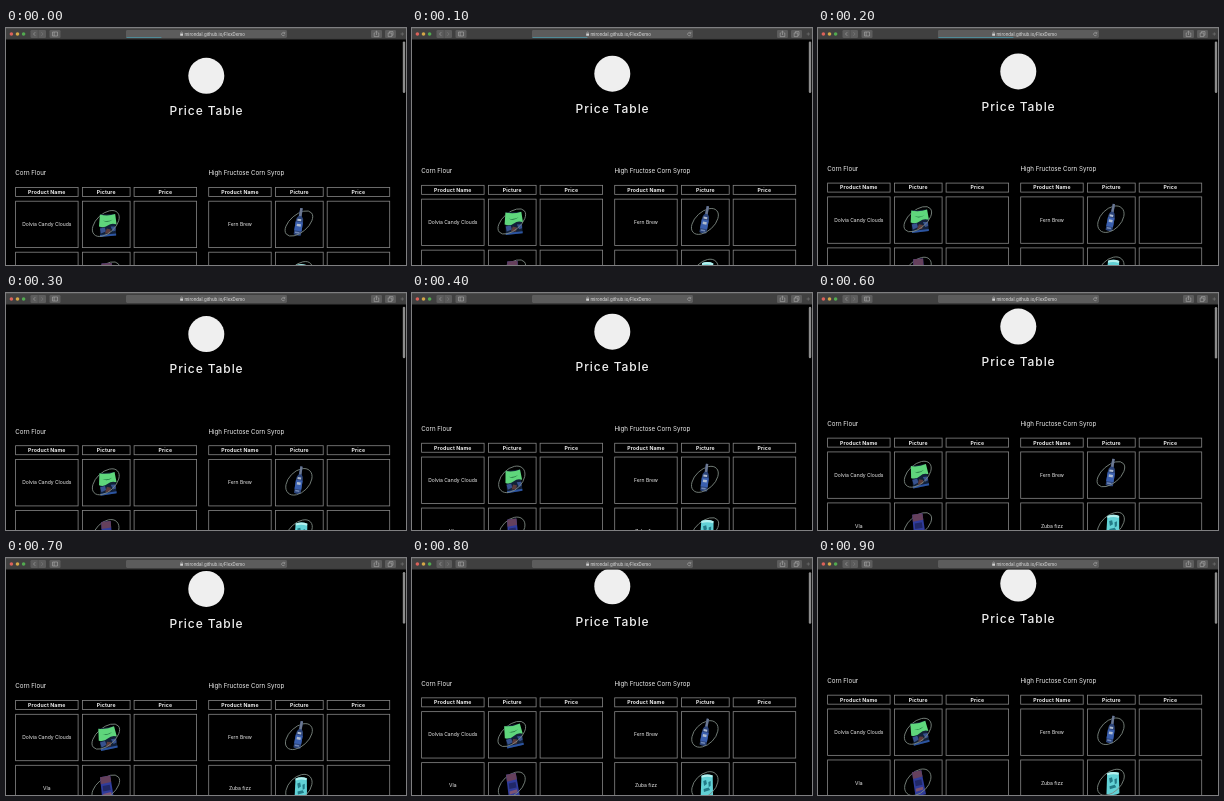
An HTML page that plays this animation: 400 px wide and 237 px high, repeating every 1 s.

```html
<!DOCTYPE html>
<html lang="en">
<head>
<meta charset="utf-8">
<title>Price Table</title>
<style>
  html, body { margin: 0; width: 100%; height: 100%; overflow: hidden; background: #000; }
  svg { display: block; width: 100vw; height: 100vh; font-family: Inter, Roboto, sans-serif; }
  .title { font-size: 12px; font-weight: 500; letter-spacing: .92px; }
  .group { font-size: 6.2px; }
  .head { font-size: 5.2px; font-weight: 700; letter-spacing: .12px; }
  .cell { font-size: 5px; }
  .url { font-size: 4.4px; font-weight: 500; }
  .mid { text-anchor: middle; }
</style>
</head>
<body>
<svg id="stage" viewBox="0 0 400 237" preserveAspectRatio="none">
  <rect width="400" height="237" fill="#000"/>
  <g id="page" fill="#efefef"></g>
  <rect id="thumb" x="396.8" width="2.4" height="51.5" rx="1.2" fill="#8c8c8c"/>
  <g id="toolbar">
    <rect width="400" height="11.4" fill="#404040"/>
    <rect width="400" height=".6" fill="#585858"/>
    <rect y="10.9" width="400" height=".5" fill="#242424"/>
    <circle cx="5.4" cy="6" r="1.8" fill="#dc625a"/>
    <circle cx="11.5" cy="6" r="1.8" fill="#d3a748"/>
    <circle cx="17.6" cy="6" r="1.8" fill="#52aa50"/>
    <g fill="#5c5c5c">
      <rect x="24.5" y="2" width="15.5" height="8" rx="1.3"/>
      <rect x="43.5" y="2" width="11" height="8" rx="1.3"/>
      <rect x="120" y="2" width="161" height="8" rx="1.4"/>
      <rect x="365" y="2" width="11" height="8" rx="1.3"/>
      <rect x="379" y="2" width="11" height="8" rx="1.3"/>
    </g>
    <path d="M32.2 2V10" stroke="#404040" stroke-width=".5"/>
    <g fill="none" stroke="#aaa" stroke-width=".6">
      <path d="M29.2 4.2l-1.7 1.8l1.7 1.8"/>
      <path d="M35.4 4.2l1.7 1.8l-1.7 1.8" stroke="#808080"/>
      <path d="M46.5 4h5v4h-5zM48.2 4v4"/>
      <path d="M369 5h-.8v3.6h4.6V5H372M370.5 7V3.2m-1.2 1l1.2-1l1.2 1"/>
      <path d="M382.2 5h3.6v3.6h-3.6zM383.4 5V3.6h3.6v3.6h-1.2"/>
      <path d="M394.6 6h3.4M396.3 4.3v3.4" stroke="#777"/>
      <path d="M278.6 5.2a1.6 1.6 0 1 0 .2 1.4M278.8 3.9v1.5h-1.4"/>
      <path d="M174.8 5.6V4.7a.8.8 0 0 1 1.6 0v.9"/>
    </g>
    <rect x="174.2" y="5.5" width="2.8" height="2.3" rx=".3" fill="#d0d0d0"/>
    <text class="url" x="178.4" y="7.6" fill="#d0d0d0">mirondal.github.io/FlexDemo</text>
    <rect id="progress" x="120.4" y="9.3" height=".7" fill="#4a9fb2"/>
  </g>
</svg>
<script>
const NS = "http://www.w3.org/2000/svg";
const byId = id => document.getElementById(id);
const page = byId("page"), thumb = byId("thumb"), progress = byId("progress");

function add(parent, tag, attrs, text) {
  const el = document.createElementNS(NS, tag);
  for (const key in attrs) el.setAttribute(key, attrs[key]);
  if (text) el.textContent = text;
  return parent.appendChild(el);
}

const shape = (parent, d, fill) => add(parent, "path", { d, fill });

// Small products drawn around their own origin; tilt and turn give the sway
const goods = {
  bag: {
    x: 2, y: 2, tilt: step => -step,
    draw(g) {
      shape(g, "M-8 -11L7.5 -11.5L8.5 10L-8 11.5Z", "#122139");
      shape(g, "M-8 -11Q0 -9 7.5 -11.5L9 -1Q4 -3 0 0T-9 1Z", "#5fd67c");
      shape(g, "M-5 -5Q0 -2 5 -6Q0 -3.4 -5 -5Z", "#1d6b3d");
      shape(g, "M-8 3L-3 2L-2 6L-7 8ZM3 1L8 1L8 5L5 6Z", "#37528f");
      shape(g, "M-1 3L3 4L2 8L-3 8Z", "#5c3b3a");
      shape(g, "M-8 9.5L8.5 8L8.5 10L-8 11.5Z", "#2c54a0");
    }
  },
  bottle: {
    x: .4, y: -1.5, tilt: step => 9 + 2 * Math.sin(step * 1.05),
    draw(g) {
      shape(g, "M-1.2 -14H1.2L1.5 -6Q3.6 -4 3.6 -1V13Q0 14.4 -3.6 13V-1Q-3.6 -4 -1.5 -6Z", "#2c4479");
      shape(g, "M-1.2 -14H1.2V-6H-1.2Z", "#6c7890");
      shape(g, "M-3.6 0H3.6V9H-3.6Z", "#3a5fae");
      shape(g, "M-2.2 -3H1.6V-1H-2.2ZM-2 2H2V4.5H-2Z", "#aebbd0");
      shape(g, "M-2.6 10H1.8V11.5H-2.6Z", "#7187b5");
    }
  },
  carton: {
    x: .8, y: 1, tilt: step => -step,
    draw(g) {
      shape(g, "M-5 -12L5 -12.5L6 12L-5.5 12.5Z", "#303c9c");
      shape(g, "M-5 -12L5 -12.5L5.2 -6L-5.1 -5Z", "#65405c");
      shape(g, "M-3.5 -3L3.5 -3.5L3.8 2L-3.6 2.5Z", "#212867");
      shape(g, "M-4 5L4 4V7L-4 8Z", "#7c5472");
    }
  },
  can: {
    x: 2, y: 1, tilt: step => 5 - step / 2,
    draw(g) {
      shape(g, "M-6 -10Q0 -12.5 6 -10.5L6.8 10Q0 13 -6.5 11Z", "#62d2d6");
      shape(g, "M-6 -10Q0 -12.5 6 -10.5L5.6 -8.5Q0 -10 -5.8 -8Z", "#b4f0ee");
      shape(g, "M-4 -5L-1 -6L0 -2L-3 0ZM1.5 -4L4 -5L4 0L2 1ZM-3.5 3L2 1.5L3.5 4L-3 6Z", "#237b87");
    }
  }
};

const items = [];
const columns = [[0, 62.5], [66.8, 47.7], [118.5, 62.5]];
const heads = ["Product Name", "Picture", "Price"];

function box(x, y, w, h) {
  add(page, "rect", { x, y, width: w, height: h, fill: "none", stroke: "#858585", "stroke-width": .8 });
}

function addItem(x, y, kind) {
  const g = add(page, "g", { transform: `translate(${x} ${y})` });
  const ring = { fill: "none", stroke: "#7c8780", "stroke-width": .85 };
  const back = add(g, "path", ring);
  const body = add(g, "g", {});
  goods[kind].draw(body);
  const front = add(g, "path", ring);
  items.push({ good: goods[kind], phase: items.length, back, body, front });
}

function addTable(x, name, rows) {
  add(page, "text", { class: "group", x: x - .3, y: 147.3 }, name);
  columns.forEach(([dx, w], i) => {
    box(x + dx, 159.4, w, 9);
    add(page, "text", { class: "head mid", x: x + dx + w / 2, y: 165.8 }, heads[i]);
  });
  rows.forEach(([label, kind], r) => {
    const y = 173.2 + r * 51;
    columns.forEach(([dx, w]) => box(x + dx, y, w, 46.4));
    add(page, "text", { class: "cell mid", x: x + 31.2, y: y + 24.8 }, label);
    addItem(x + 90.2, y + 22.3, kind);
  });
}

add(page, "circle", { cx: 200.3, cy: 47.8, r: 18 });
add(page, "text", { class: "title mid", x: 200.6, y: 87.2 }, "Price Table");
addTable(9.6, "Corn Flour", [["Dolvia Candy Clouds", "bag"], ["Vla", "carton"]]);
addTable(202.7, "High Fructose Corn Syrop", [["Fern Brew", "bottle"], ["Zuba fizz", "can"]]);

// Scrolling speeds up slightly over the loop
const scrollAt = step => 2 * step + .9 * step * step / (step + 6) - .07 * step;

function pose({ good, phase, back, body, front }, step) {
  const wave = Math.sin(step * 1.05 + phase);
  const rx = 16 + .5 * wave, ry = 9.6 - .8 * wave;
  [back, front].forEach((el, side) => {
    el.setAttribute("d", `M${-rx} 0A${rx} ${ry} 0 0 ${1 - side} ${rx} 0`);
    el.setAttribute("transform", `rotate(${-43 + 3 * wave})`);
  });
  body.setAttribute("transform",
    `translate(${good.x} ${good.y}) rotate(${good.tilt(step)}) scale(${.98 + .05 * wave} 1)`);
}

function draw(ms) {
  const step = Math.floor(ms % 1000 / 100);
  const scroll = scrollAt(step);
  page.setAttribute("transform", `translate(0 ${-scroll})`);
  thumb.setAttribute("y", 13.4 + scroll * .04);
  progress.setAttribute("width", step < 3 ? 35 + 20 * step : 0);
  items.forEach(item => pose(item, step));
}

const start = performance.now();
function tick() {
  draw(performance.now() - start);
  requestAnimationFrame(tick);
}
tick();
</script>
</body>
</html>
```
